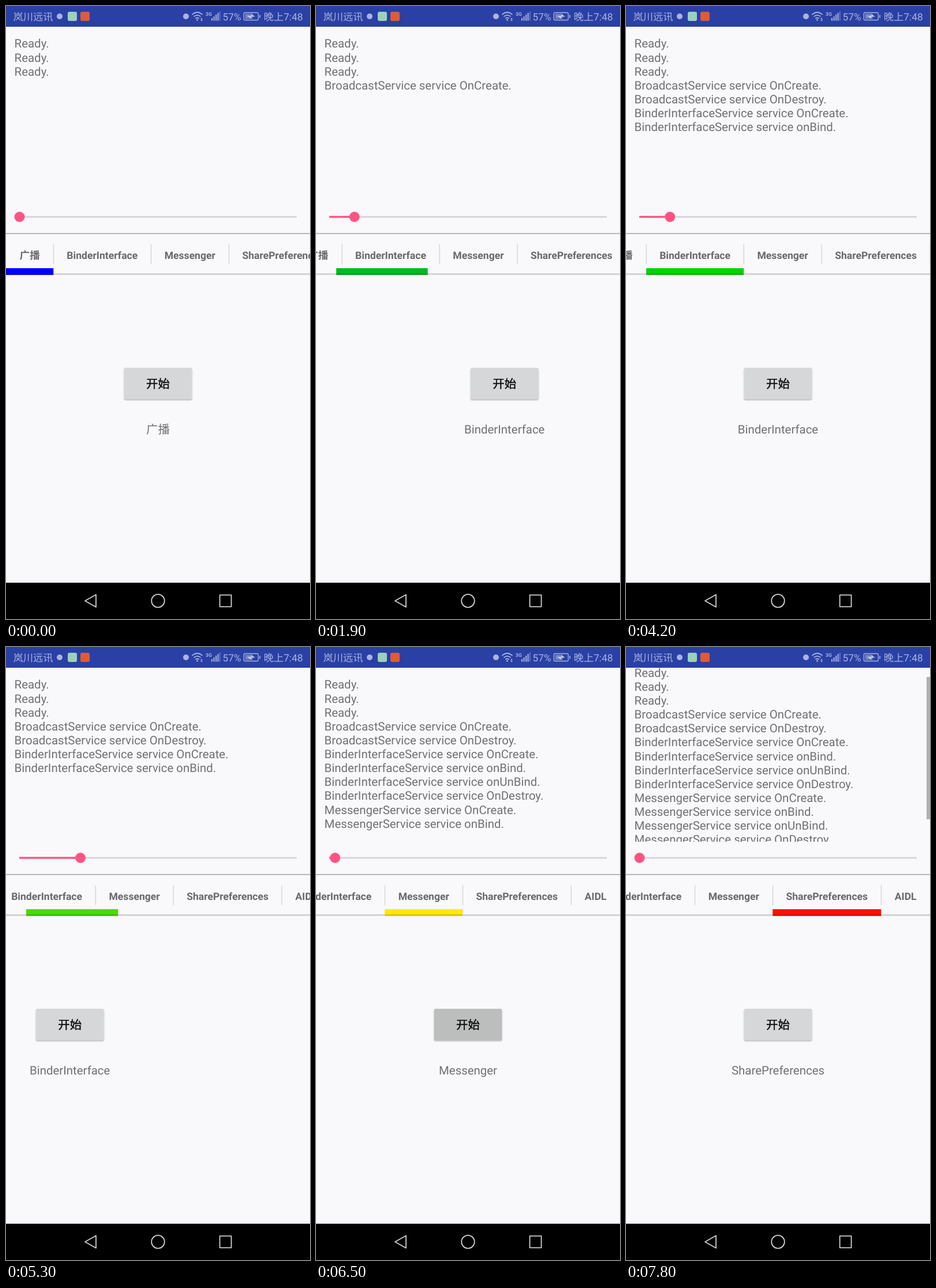
Recreate the animation shown at these times as an HTML page. Size 527 by 1064 pixels, loop 8 s.

```html
<!DOCTYPE html>
<html lang="zh-CN">
<head>
<meta charset="utf-8">
<title>Service demo</title>
<style>
  html, body { margin: 0; width: 100%; height: 100%; overflow: hidden; background: #f9f8fb; }
  svg { display: block; width: 100vw; height: 100vh; }
  text {
    font-family: Roboto, "Noto Sans CJK SC", "Noto Sans CJK", sans-serif; font-size: 20.43px;
    fill: #707072; white-space: pre; text-rendering: geometricPrecision;
  }
  .tab { font-size: 17.57px; font-weight: 700; fill: #69686b; text-anchor: middle; }
  .label, .caption { text-anchor: middle; }
  .caption { fill: #0c0c0c; stroke: #0c0c0c; stroke-width: .45; }
  .status text { font-size: 17.3px; fill: #aab4df; }
  .status .tiny { font-size: 8.5px; font-weight: 700; }
  .nav { fill: none; stroke: #cfcfcf; stroke-width: 1.8; stroke-linejoin: round; }
</style>
</head>
<body>
<svg viewBox="0 0 527 1064">
  <defs>
    <clipPath id="logClip"><rect y="36" width="527" height="302"/></clipPath>
    <filter id="shadow" x="-10%" y="-10%" width="120%" height="130%">
      <feDropShadow dx="0" dy="1.6" stdDeviation="1.2" flood-color="#000" flood-opacity=".36"/>
    </filter>
  </defs>
  <rect width="527" height="1064" fill="#f9f8fb"/>

  <g clip-path="url(#logClip)">
    <g id="log"></g>
    <rect id="scrollbar" x="521" y="52" width="6" height="247" fill="#b1b0b3"/>
  </g>

  <rect x="23" y="364.6" width="481" height="2.8" fill="#d5d3d7"/>
  <rect id="played" x="23" y="364.4" height="3.2" fill="#ff4f7f"/>
  <circle id="thumb" cy="366" r="9" fill="#ff5483"/>
  <rect y="394" width="527" height="1.8" fill="#b3b1b5"/>

  <g id="strip"><rect id="indicator" y="455.1" height="11.7"/></g>
  <rect y="463.9" width="527" height="2.9" fill="#000" fill-opacity=".155"/>
  <g id="pager"></g>

  <g class="status">
    <rect width="527" height="36" fill="#2a40a5"/>
    <text x="12.5" y="24.6">岚川远讯</text>
    <circle cx="93" cy="18" r="5" fill="#aab4df"/>
    <rect x="107" y="10" width="16" height="16" rx="3" fill="#9bd0bd"/>
    <rect x="129" y="10" width="16" height="16" rx="3" fill="#dc5c35"/>
    <circle cx="312" cy="18" r="5" fill="#aab4df"/>
    <g fill="none" stroke="#aab4df" stroke-width="1.7">
      <path d="M322.5 15q9-8 18 0M325.5 18.4q6-5 12 0M328.3 21.6q3.2-2.5 6.4 0"/>
      <rect x="412.3" y="11.5" width="25" height="13" rx="2" stroke-width="1.3"/>
      <path d="M440 15.5v5"/>
    </g>
    <circle cx="331.5" cy="24" r="1.5" fill="#aab4df"/>
    <path d="M337 23l2-2.5 2 2.5zM337 24l2 2.5 2-2.5z" fill="#aab4df"/>
    <text class="tiny" x="346" y="16.6">3G</text>
    <path d="M356 21h2v4.5h-2zM359.6 18h2v7.5h-2zM363.2 15h2v10.5h-2zM366.6 12h2v13.5h-2z" fill="#aab4df"/>
    <path d="M370 9.5h1.6v16h-1.6z" fill="#6c7bc0"/>
    <text x="375.5" y="24.6">57%</text>
    <rect x="414.5" y="13.5" width="13" height="9" fill="#7383c5"/>
    <path d="M418 17l7.5 0 0-3 6.5 4.5-7 0 0 3.5z" fill="#c6cdec"/>
    <text x="446.8" y="24.6">晚上7:48</text>
  </g>

  <rect y="1001" width="527" height="63" fill="#000"/>
  <g class="nav">
    <path d="M137 1032.500L156 1021.800V1043.300z"/>
    <circle cx="263.500" cy="1032.500" r="11.300"/>
    <rect x="370.600" y="1022.400" width="20" height="20.200"/>
  </g>
</svg>
<script>
  const LOOP = 8000, STEP = 100, WIDTH = 527, MID = WIDTH / 2;
  const tabs = ["广播", "BinderInterface", "Messenger", "SharePreferences", "AIDL"];
  const edges = [0, 82.3, 251.3, 386.3, 574.3, 659];
  const colors = [[0, 0, 255], [0, 212, 0], [255, 234, 0], [255, 16, 0]];
  const swipeEnds = [2100, 5700, 7600];
  const swipeCurve = [0, .03, .09, .186, .29, .6, .88, .97, 1];
  const presses = [1000, 3100, 6400];
  const pressCurve = [.6, 1, .7, .45, .25, .12, .06];
  const runs = [[1000, 2300], [3100, 5900], [6300, 7800]];
  const messages = [
    [0, "Ready."], [0, "Ready."], [0, "Ready."],
    [1000, "BroadcastService service OnCreate."],
    [2200, "BroadcastService service OnDestroy."],
    [3100, "BinderInterfaceService service OnCreate."],
    [3100, "BinderInterfaceService service onBind."],
    [5800, "BinderInterfaceService service onUnBind."],
    [5800, "BinderInterfaceService service OnDestroy."],
    [6400, "MessengerService service OnCreate."],
    [6400, "MessengerService service onBind."],
    [7700, "MessengerService service onUnBind."],
    [7700, "MessengerService service OnDestroy."]
  ];

  const byId = id => document.getElementById(id);
  const set = (node, attrs) => {
    for (const key in attrs) node.setAttribute(key, attrs[key]);
    return node;
  };
  const add = (parent, tag, attrs, text = "") => {
    const node = document.createElementNS("http://www.w3.org/2000/svg", tag);
    node.textContent = text;
    return parent.appendChild(set(node, attrs));
  };
  const clamp = (v, lo, hi) => Math.min(hi, Math.max(lo, v));
  const mix = (a, b, k) => a + (b - a) * k;
  const mixColor = (a, b, k) => `rgb(${a.map((v, i) => Math.round(mix(v, b[i], k)))})`;
  const visibility = shown => ({ visibility: shown ? "visible" : "hidden" });

  const [log, scrollbar, played, thumb, strip, indicator, pager] =
    ["log", "scrollbar", "played", "thumb", "strip", "indicator", "pager"].map(byId);

  const lines = messages.map(([, text], i) =>
    add(log, "text", { x: 14.6, y: 72.4 + i * 24.13 }, text));

  tabs.forEach((name, i) => {
    add(strip, "text", { class: "tab", x: (edges[i] + edges[i + 1]) / 2, y: 438.6 }, name);
    if (i) add(strip, "rect", { x: edges[i] - .5, y: 413.5, width: 1.3, height: 34.5, fill: "#d2d0d4" });
  });

  const buttons = tabs.slice(0, 4).map((name, i) => {
    const page = add(pager, "g", { transform: `translate(${i * WIDTH})` });
    const button = add(page, "rect",
      { x: 204.7, y: 628, width: 117.6, height: 54.3, rx: 2.5, filter: "url(#shadow)" });
    add(page, "text", { class: "caption", x: MID, y: 663 }, "开始");
    add(page, "text", { class: "label", x: MID, y: 742 }, name);
    return button;
  });

  // Sum of the three swipes: 0 on the first page, 3 on the last.
  const pagePosition = t => swipeEnds.reduce((sum, end) =>
    sum + swipeCurve[clamp((t - end) / STEP + 8, 0, 8)], 0);

  function draw(t) {
    lines.forEach((line, i) => set(line, visibility(t >= messages[i][0])));
    const scrolled = t >= 7800;
    set(log, { transform: `translate(0 ${scrolled ? -20.6 : 0})` });
    set(scrollbar, visibility(scrolled));

    const run = runs.find(([from, to]) => t >= from && t < to);
    const progress = run ? (t - run[0]) / STEP * 4.8 : 0;
    set(played, { width: progress });
    set(thumb, { cx: 23.5 + progress });

    const position = pagePosition(t);
    const page = Math.floor(position), part = position - page;
    const left = mix(edges[page], edges[page + 1], part);
    const right = mix(edges[page + 1], edges[page + 2], part);
    set(indicator, {
      x: left, width: right - left,
      fill: mixColor(colors[page], colors[Math.min(page + 1, 3)], part)
    });
    set(strip, { transform: `translate(${-clamp(left - 35.1, 0, 132)})` });
    set(pager, { transform: `translate(${-position * WIDTH})` });

    buttons.forEach((button, i) => {
      const level = pressCurve[(t - presses[i]) / STEP] || 0;
      set(button, { fill: mixColor([213, 215, 216], [188, 190, 190], level) });
    });
  }

  const start = performance.now();
  function tick() {
    const t = (performance.now() - start) % LOOP;
    draw(Math.floor(t / STEP) * STEP);
    requestAnimationFrame(tick);
  }
  tick();
</script>
</body>
</html>
```
